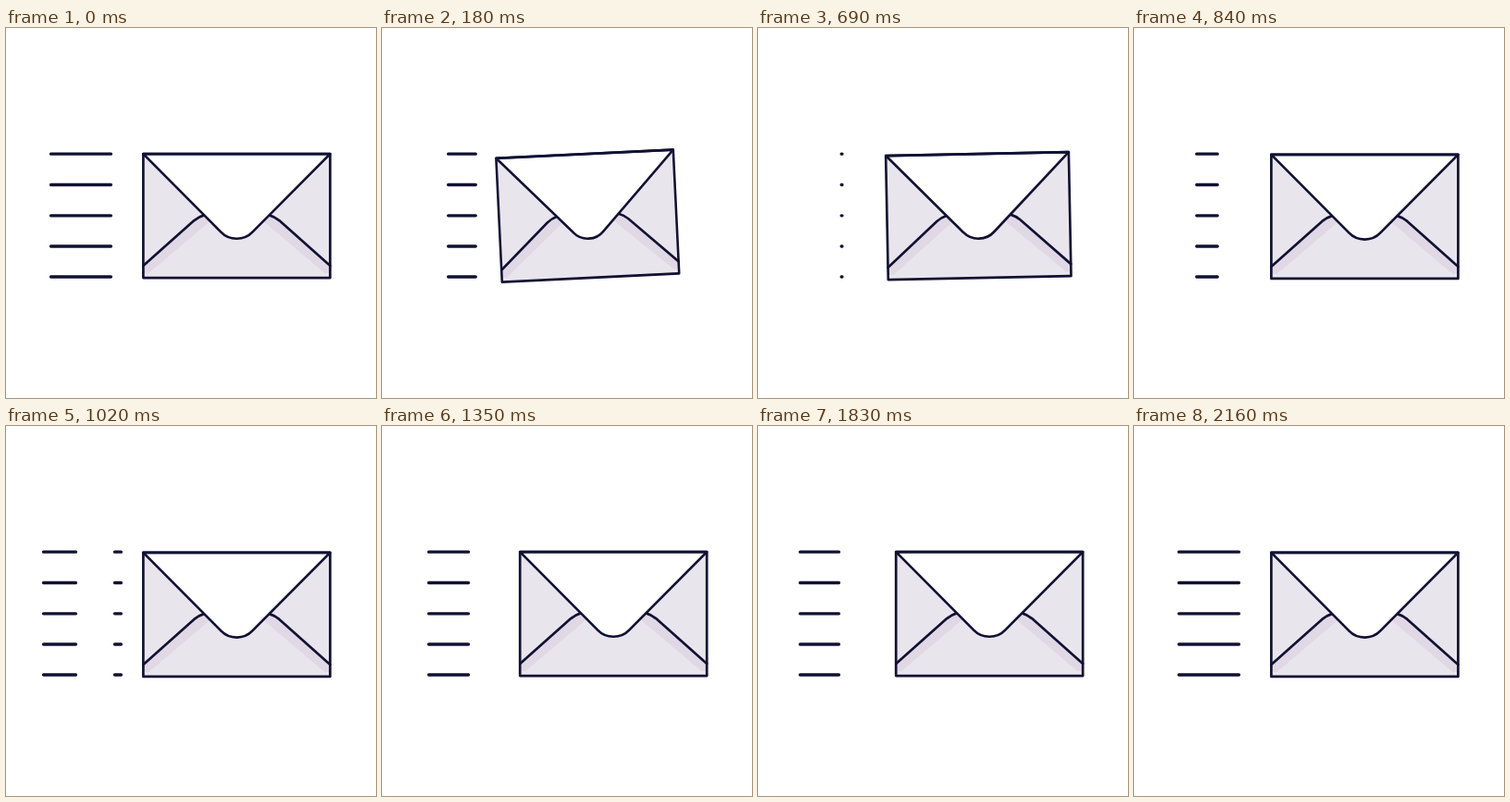
An HTML page that plays this animation: 400 by 400 pixels, repeating every 4.19 s.

```html
<!DOCTYPE html>
<html lang="en">
<head>
<meta charset="utf-8">
<title>Flying envelope</title>
<style>
  html, body { margin: 0; width: 100%; height: 100%; overflow: hidden; background: #fff; }
  svg { display: block; width: 100%; height: 100%; }
  .ink { fill: none; stroke: #111133; stroke-width: 2.7; stroke-linecap: round; stroke-linejoin: round; }
  .speed { stroke-width: 3.3; }
  .paper { fill: #e9e5ed; }
  .shade { fill: #e1d8e5; }
  .flap { fill: #fff; }
</style>
</head>
<body>
<svg viewBox="0 0 400 400">
  <path id="speed" class="ink speed"/>
  <g id="envelope">
    <path class="paper" d="M-101-67H101V67H-101Z"/>
    <path class="shade" d="M-36 0L-29 6L-95 62L-101 62V54L-46 5ZM36 0L29 6L95 62L101 62V54L46 5Z"/>
    <path class="ink" d="M-101 54L-46 5Q-41 1-36-.5M101 54L46 5Q41 1 36-.5"/>
    <path class="ink flap" d="M-101-67L-17 17.5C-8 27 8 27 17 17.5L101-67Z"/>
    <path class="ink" d="M-101-67H101V67H-101Z"/>
  </g>
</svg>
<script>
  const LOOP = 4190, STEP = 30, REST = 2160;
  const PULLED = 520, RELEASED = 735;
  const TRACK = { from: 40.5, to: 124.5 };
  const SPAN = TRACK.to - TRACK.from;
  const ROWS = [136.2, 169.5, 202.8, 236, 269];

  // Unwrapped ends of the streaming dash: time, left, right
  const STREAM = [
    [680, 91, 91],
    [1020, 33.5, 75.5],
    [1350, -33.5, 9.5],
    [1830, -122.5, -80.5],
    [REST, -203.5, -138.5]
  ];

  const envelope = document.getElementById('envelope');
  const speed = document.getElementById('speed');

  const mix = (a, b, u) => a + (b - a) * u;
  const progress = (t, from, to) => Math.min(1, Math.max(0, (t - from) / (to - from)));
  const smooth = u => u * u * (3 - 2 * u);

  function dashAt(t) {
    if (t < STREAM[0][0]) {
      const u = smooth(progress(t, 0, 340));
      return [mix(48.5, 91, u), mix(113.5, 91, u)];
    }
    const i = Math.max(1, STREAM.findIndex(key => t <= key[0]));
    const [t0, left0, right0] = STREAM[i - 1];
    const [t1, left1, right1] = STREAM[i];
    const u = progress(t, t0, t1);
    const launch = i === 1;
    return [
      mix(left0, left1, launch ? u ** 1.2 : u),
      mix(right0, right1, launch ? u ** 4 : u)
    ];
  }

  function drawSpeed(t) {
    const [left, right] = dashAt(t);
    let d = '';
    for (let lap = 0; lap < 4; lap++) {
      const a = Math.max(TRACK.from, left + lap * SPAN);
      const b = Math.min(TRACK.to, right + lap * SPAN);
      if (b > a) d += ROWS.map(y => `M${a} ${y}H${b}`).join('');
    }
    speed.setAttribute('d', d);
  }

  function drawEnvelope(t) {
    const pull = t < PULLED
      ? smooth(progress(t, 0, PULLED))
      : 1 - smooth(progress(t, PULLED, RELEASED));
    let x = 249.4 - 98 * pull, y = 203.1;
    if (t > RELEASED) {
      // Rattle in flight
      if (t / STEP % 2) x += 0.8;
      else y += 0.8;
    }
    envelope.setAttribute('transform',
      `translate(${x} ${y}) rotate(${-10 * pull}) scale(${1 - 0.185 * pull} 1)`);
  }

  function frame(now) {
    const t = Math.min(REST, Math.floor(now % LOOP / STEP) * STEP);
    drawSpeed(t);
    drawEnvelope(t);
    requestAnimationFrame(frame);
  }

  frame(0);
</script>
</body>
</html>
```
